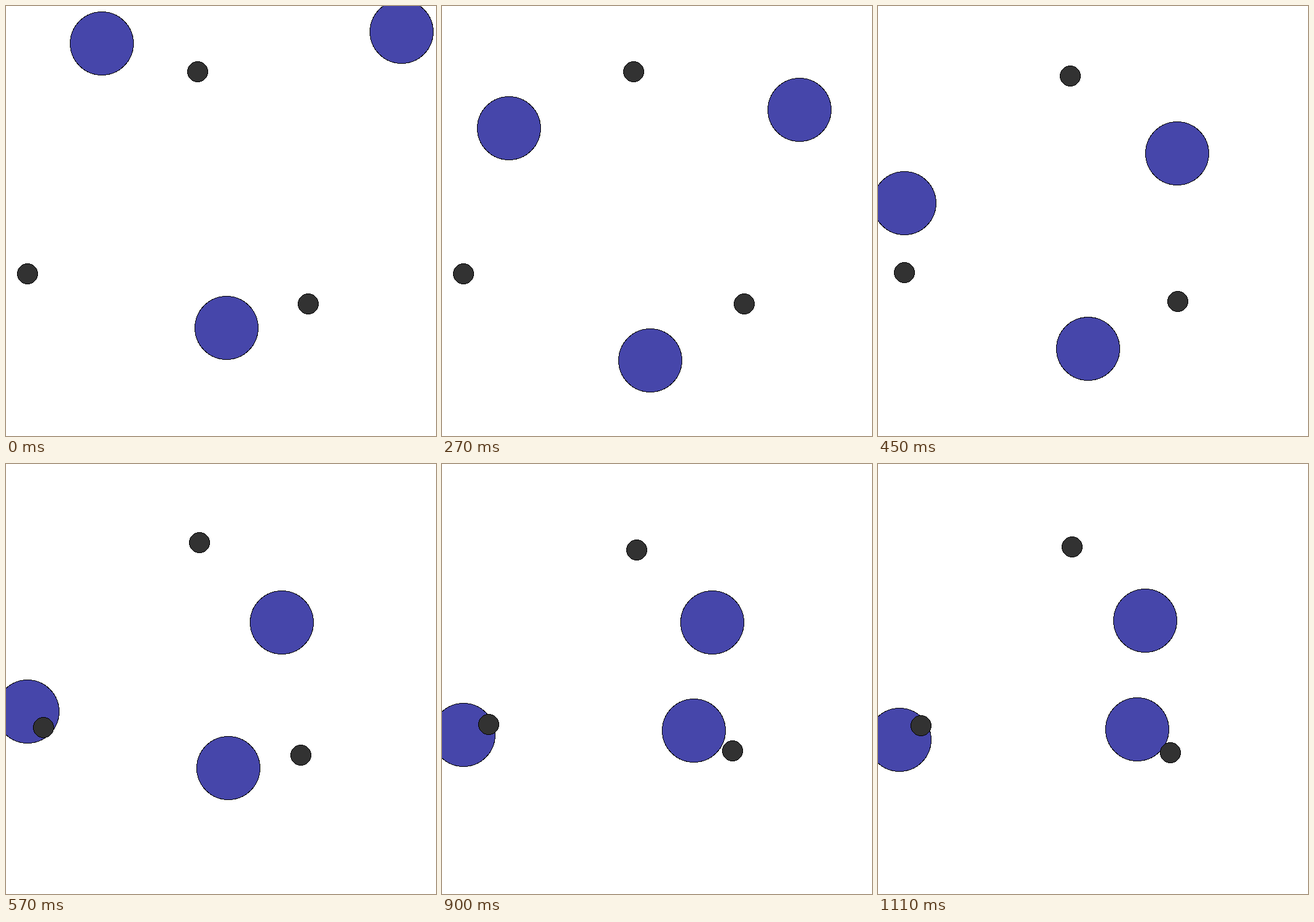
Write an HTML page that moves like this. It is 700 by 700 pixels and loops after 1170 ms.

```html
<!DOCTYPE html>
<html lang="en">
<head>
<meta charset="utf-8">
<title>Circles</title>
<style>
  html, body { margin: 0; width: 100%; height: 100%; overflow: hidden; background: #fff; }
  svg { display: block; width: 700px; height: 700px; }
  circle { stroke: #000; stroke-width: 1; shape-rendering: crispEdges; }
  .ball { fill: #4646aa; }
  .dot { fill: #323232; }
</style>
</head>
<body>
<svg viewBox="0 0 700 700"></svg>
<script>
const LOOP = 1170;
const KNOTS = [0, 3, 7, 12, 16, 19, 24];

const balls = [
  { x: [156, 156, 55, 35, 35, 35, 35], y: [61, 145, 254, 403, 435, 441, 449] },
  { x: [644, 628, 525, 449, 437, 440, 435], y: [42, 110, 217, 258, 256, 258, 255] },
  { x: [359, 347, 335, 362, 383, 410, 422], y: [524, 564, 583, 495, 461, 434, 432] }
];

// Dots share one inward pull; dx, dy is the shift at full pull.
const dots = [
  { x: 312, y: 107, dx: 4.51, dy: 33 },
  { x: 35, y: 436, dx: 41, dy: -11.6 },
  { x: 492, y: 485, dx: -19, dy: -17.6 }
];
const PULL = [0, 0, 0, 0.64, 0.775, 1, 0.85];

// Monotone cubic curve through the knots, without overshoot.
function curve(values) {
  const slopes = values.slice(1).map((v, i) => (v - values[i]) / (KNOTS[i + 1] - KNOTS[i]));
  const tangents = values.map((_, i) => {
    if (i === 0) return slopes[0];
    if (i === slopes.length) return slopes[i - 1];
    const a = slopes[i - 1], b = slopes[i];
    return a * b > 0 ? 2 * a * b / (a + b) : 0;
  });
  return step => {
    let i = 0;
    while (i < KNOTS.length - 2 && step >= KNOTS[i + 1]) i++;
    const h = KNOTS[i + 1] - KNOTS[i];
    const u = (step - KNOTS[i]) / h, w = 1 - u;
    return values[i] * w * w * (1 + 2 * u) + values[i + 1] * u * u * (3 - 2 * u)
      + h * u * w * (tangents[i] * w - tangents[i + 1] * u);
  };
}

const svg = document.querySelector("svg");

function addCircle(kind, radius) {
  const el = document.createElementNS("http://www.w3.org/2000/svg", "circle");
  el.setAttribute("class", kind);
  el.setAttribute("r", radius - 0.5);
  return svg.appendChild(el);
}

function place(el, x, y) {
  el.setAttribute("cx", Math.round(x));
  el.setAttribute("cy", Math.round(y));
}

const pull = curve(PULL);
const movers = [
  ...balls.map(b => {
    const el = addCircle("ball", 52), x = curve(b.x), y = curve(b.y);
    return step => place(el, x(step), y(step));
  }),
  ...dots.map(d => {
    const el = addCircle("dot", 17);
    return step => place(el, d.x + d.dx * pull(step), d.y + d.dy * pull(step));
  })
];

// Two steps every 90 ms, held for 30 and 60 ms.
function stepAt(t) {
  return Math.max(0, 2 * Math.floor(t / 90) - (t % 90 < 30 ? 1 : 0));
}

const start = performance.now();
function draw() {
  const step = stepAt((performance.now() - start) % LOOP);
  movers.forEach(move => move(step));
  requestAnimationFrame(draw);
}
draw();
</script>
</body>
</html>
```
